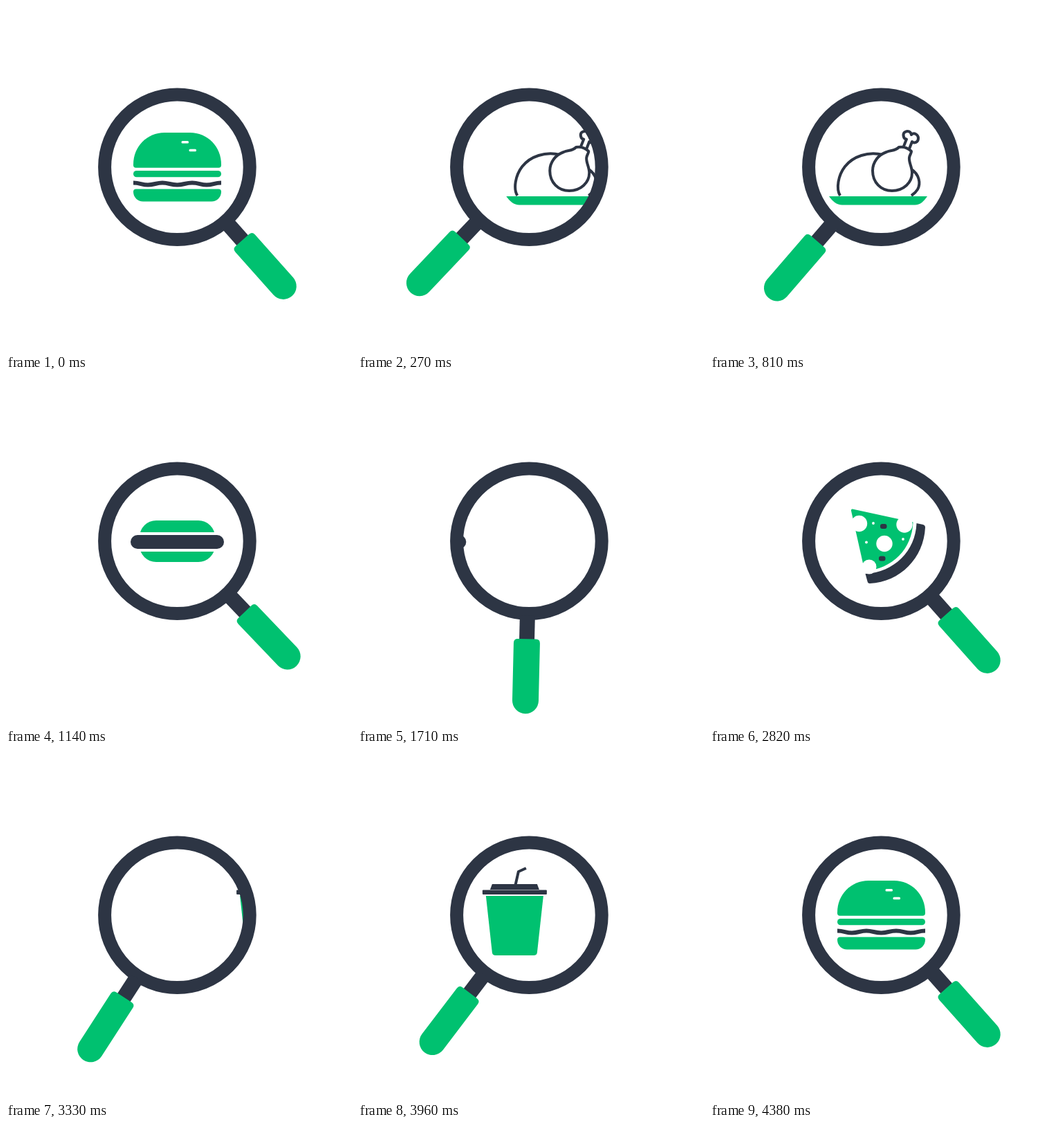
Animation of 500 by 500 pixels, one loop 4.71 s. Source, as an HTML page:

```html
<!DOCTYPE html>
<html lang="en">
<head>
<meta charset="utf-8">
<title>Food search</title>
<style>
  html, body { margin: 0; width: 100%; height: 100%; overflow: hidden; background: #fff; }
  svg { display: block; width: 100vw; height: 100vh; }
  .g { fill: #00c170; }
  .d { fill: #2d3544; }
  .w { fill: #fff; }
  .line { fill: none; stroke: #2d3544; stroke-width: 4; stroke-linejoin: round; }
  .dish { display: none; }
</style>
</head>
<body>
<svg viewBox="0 0 500 500">
  <defs>
    <clipPath id="lens"><circle cx="247.4" cy="232.8" r="100"/></clipPath>
    <clipPath id="aboveBowl"><rect x="150" y="150" width="200" height="80.5"/></clipPath>
    <g id="coil">
      <circle class="w" r="33"/>
      <g class="line" stroke-width="4.5"><circle r="31"/><circle r="21.5"/><circle r="12"/></g>
    </g>
  </defs>

  <g clip-path="url(#lens)">
    <!-- burger -->
    <g class="dish">
      <path class="g" d="M184 229C184 203 204 183 229 183H266C291 183 311 203 311 229V230a3.7 3.7 0 0 1-3.7 3.7H187.7a3.7 3.7 0 0 1-3.7-3.7Z"/>
      <rect class="w" x="253.5" y="195" width="10.5" height="3.6" rx="1.5"/>
      <rect class="w" x="264.5" y="206.7" width="10.5" height="3.6" rx="1.5"/>
      <rect class="g" x="184" y="238" width="127" height="9.3" rx="4.6"/>
      <path class="line" style="stroke-width:6" d="M184 255.5C194 255.5 196 258.5 205 258.5S217 255.5 226 255.5S238 258.5 247.5 258.5S259 255.5 269 255.5S281 258.5 290 258.5S301 255.5 311 255.5"/>
      <path class="g" d="M188 264.5H307q4 0 4 4a14 14 0 0 1-14 14H198a14 14 0 0 1-14-14q0-4 4-4Z"/>
    </g>

    <!-- roast chicken -->
    <g class="dish"><g transform="translate(4.6 0)">
      <path class="line" d="M188 274C182 264 185 245 195 232C207 217 228 210 250 215M291 236C302 243 305 256 300 265Q297 270 291 274"/>
      <path class="line" style="fill:#fff" d="M279 205L284 192.500C279 192 278 184 282 182C286 180 290 181 291 186C295 182 301 186 301 191C301 197 295 199 292 196L287 209"/>
      <path class="line" style="fill:#fff" d="M273 204C267 210 262 208 255 211C243 215 235 226 235 238C235 255 247 267 263 267C280 267 292 255 292 241C292 232 287 226 288 219C289 214 291 213 291 210C286 205 279 203 273 204Z"/>
      <path class="g" d="M172 275H314C309 282 304 287.500 296 287.500H191C183 287.500 177 282 172 275Z"/>
    </g></g>

    <!-- hot dog -->
    <g class="dish">
      <rect class="g" x="193" y="203" width="109" height="60" rx="24"/>
      <rect class="w" x="176" y="220" width="143" height="28" rx="14"/>
      <rect class="d" x="180" y="224" width="135" height="20" rx="10"/>
    </g>

    <!-- noodles -->
    <g class="dish"><g transform="translate(4.6 0)">
      <g clip-path="url(#aboveBowl)">
        <use href="#coil" x="243" y="207.500"/>
        <use href="#coil" x="270" y="233"/>
        <use href="#coil" x="215" y="233"/>
      </g>
      <path class="g" d="M176 232H310C310 258 292 280 266 284V289q0 3-3 3H221q-3 0-3-3V284C194 280 176 258 176 232Z"/>
    </g></g>

    <!-- pizza -->
    <g class="dish">
      <path class="g" d="M206 186.500L293.500 205.500C292 244 264 273 223.500 276L204 189Q203.500 186 206 186.500Z"/>
      <path class="d" d="M298.500 207L308 209Q311 210 311 213C309 257 275 292 231 294Q228 294 227.500 291L224.500 280C266 278 297 247 298.500 207Z"/>
      <g class="w">
        <circle cx="215.500" cy="207.500" r="11.700"/><circle cx="281" cy="209" r="11.700"/>
        <circle cx="252" cy="236.500" r="11.700"/><circle cx="230" cy="270" r="10.500"/>
        <circle cx="236" cy="207" r="1.900"/><circle cx="226" cy="234.500" r="1.900"/><circle cx="279" cy="230" r="1.900"/>
      </g>
      <rect class="d" x="246" y="208" width="9.500" height="7" rx="3"/>
      <rect class="d" x="244" y="254.500" width="9.500" height="7" rx="3"/>
    </g>

    <!-- drink -->
    <g class="dish">
      <path class="line" d="M248 192L253 170L264 165"/>
      <path class="d" d="M212 196L215 188H280L283 196Z"/>
      <rect class="d" x="201" y="196.500" width="93" height="6.500" rx="1"/>
      <path class="g" d="M206 205H289L280 287q-.5 4-5 4H220q-4.500 0-5-4Z"/>
    </g>
  </g>

  <circle class="line" style="stroke-width:19" cx="247.4" cy="232.8" r="104.8"/>
  <g id="handle">
    <rect class="d" x="-11" y="108" width="22" height="36"/>
    <path class="g" d="M-13 141.500H13q6 0 6 6V230.500a19 19 0 0 1-38 0V147.500q0-6 6-6Z"/>
  </g>
</svg>
<script>
  const STEP = 30, LOOP = 157, SWING = 26;
  const REST = 41.7, OVER = 2.7;
  const dishes = [...document.querySelectorAll('.dish')];
  const handle = document.getElementById('handle');

  const bez = (a, b, s) => 3 * a * s * (1 - s) ** 2 + 3 * b * s * s * (1 - s) + s ** 3;

  function ease(x) {
    let lo = 0, hi = 1;
    for (let i = 0; i < 24; i++) {
      const mid = (lo + hi) / 2;
      if (bez(.58, .42, mid) < x) lo = mid; else hi = mid;
    }
    return bez(0, 1, lo);
  }

  // Swing past the far side in ten steps, then settle back in six.
  function swingAngle(k) {
    if (k <= 10) return -REST + (2 * REST + OVER) * ease(k / 10);
    const u = Math.min(1, (k - 10) / 6);
    return REST + OVER * (1 - u * u * (3 - 2 * u));
  }

  const slide = k => 4.6 * Math.max(0, k) ** 2.2;

  function place(dish, x) {
    dish.style.display = Math.abs(x) < 230 ? 'inline' : 'none';
    dish.setAttribute('transform', `translate(${x} 0)`);
  }

  function draw(now) {
    const step = Math.floor(now / STEP) % LOOP;
    const turn = Math.min(5, Math.floor(step / SWING));
    const k = step - turn * SWING;
    const side = turn % 2 ? -1 : 1;
    handle.setAttribute('transform', `translate(247.4 232.8) rotate(${side * swingAngle(k)})`);
    dishes.forEach(d => d.style.display = 'none');
    place(dishes[turn], -slide(k));
    place(dishes[(turn + 1) % 6], slide(11.6 - k));
  }

  const start = performance.now();
  function tick() {
    draw(performance.now() - start);
    requestAnimationFrame(tick);
  }
  tick();
</script>
</body>
</html>
```
